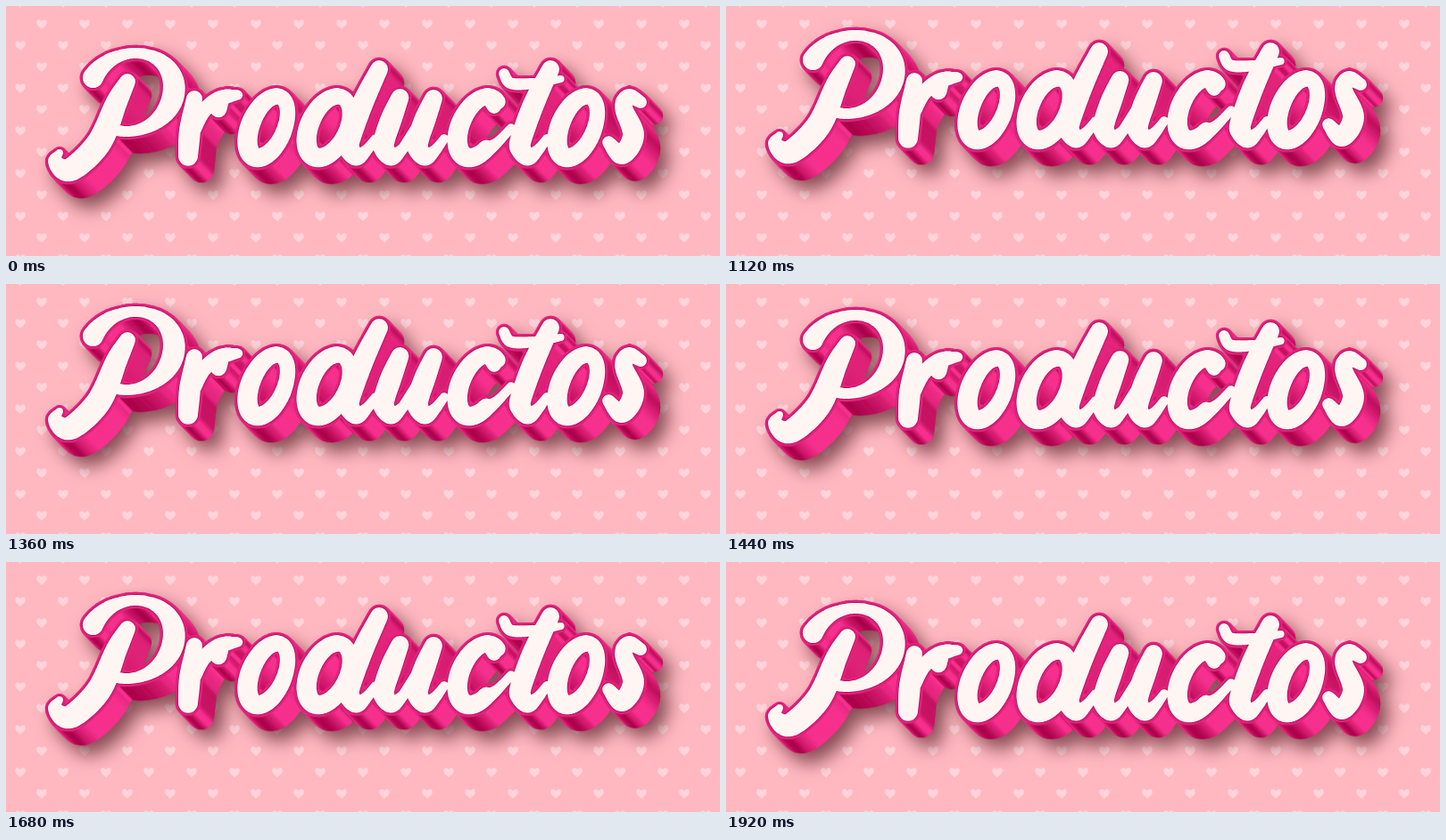
These frames come from a looping animation (800x281 px, 1.96 s). An HTML page with a canvas:

```html
<!DOCTYPE html>
<html lang="es">
<head>
<meta charset="utf-8">
<title>Productos</title>
<style>
html, body { margin: 0; width: 100%; height: 100%; overflow: hidden; background: #ffb8c0; }
canvas { display: block; }
</style>
</head>
<body>
<canvas id="stage" width="800" height="281" role="img" aria-label="Productos"></canvas>
<script>
const W = 800, H = 281, LOOP = 1960, STEP = 40;
const DEPTH = { x: 15, y: 15.5, layers: 34 };
const RIM = 3.2;
const MID = 136, HALF = 34.5;

// Every pen stroke is a list of round stamps [x, y, radius].
function spline(a, b, c, d, t) {
  return b + 0.5 * t * (c - a + t * (2 * a - 5 * b + 4 * c - d + t * (3 * (b - c) + d - a)));
}

function curve(...pts) {
  const at = i => pts[Math.max(0, Math.min(pts.length - 1, i))];
  const stamps = [];
  for (let i = 0; i < pts.length - 1; i++) {
    for (let t = 0; t <= 1; t += 1 / 40) {
      stamps.push([0, 1, 2].map(k =>
        spline(at(i - 1)[k], at(i)[k], at(i + 1)[k], at(i + 2)[k], t)));
    }
  }
  return stamps;
}

// Leaning elliptic arc; nib(cos, sin) gives the pen radius.
function arc(cx, cy, rx, ry, lean, from, to, nib) {
  const stamps = [];
  for (let deg = from; deg <= to; deg += 1.5) {
    const c = Math.cos(deg * Math.PI / 180), s = Math.sin(deg * Math.PI / 180);
    stamps.push([cx + rx * c - lean * ry * s, cy + ry * s, nib(c, s)]);
  }
  return stamps;
}

const ring = (cx, rx, from = 0, to = 360) =>
  arc(cx, MID, rx, HALF, 0.3, from, to, (c, s) => 10 - c + 0.8 * s);

// Slanted downstroke that curls up into the next letter.
function stem(x, top) {
  const slant = y => x + 0.3 * (150 - y) + 0.0015 * (150 - y) ** 2;
  const mid = (top + 150) / 2;
  return curve([slant(top), top, 10], [slant(mid), mid, 12], [x, 150, 12],
    [x, 161, 11.5], [x + 8, 170, 9.5], [x + 19, 162, 6.5], [x + 29, 149, 5]);
}

const strokes = [
  // P
  arc(140, 97, 48, 44, 0.12, -158, 100, c => 6 + 6.5 * c * c),
  curve([136, 85, 9], [124, 108, 12], [104, 154, 14], [72, 184, 13], [55, 175, 8], [60, 165, 4]),
  // r
  curve([211, 104, 9], [206, 140, 12], [204, 169, 11]),
  curve([213, 141, 5], [222, 118, 8], [240, 104, 9], [260, 100, 5.5]),
  curve([241, 106, 9], [238, 116, 9.5]),
  // o, d, u
  ring(293, 20),
  ring(361, 22), stem(385, 71),
  stem(424, 103), curve([443, 163, 6], [465, 128, 6]), stem(462, 104),
  // c
  ring(530, 22, 45, 305), curve([542, 105, 8], [547, 113, 8]),
  curve([537, 163, 9], [551, 153, 6], [566, 137, 5]),
  // t, o
  stem(577, 71), curve([558, 76, 6], [566, 87, 6.5], [592, 87, 6], [622, 82, 4]),
  ring(640, 20),
  // s
  curve([711, 108, 7], [698, 102, 9], [692, 114, 10], [703, 145, 12], [690, 167, 11], [675, 153, 7])
];

function layer() {
  const c = document.createElement('canvas');
  c.width = W;
  c.height = H;
  return c.getContext('2d', { willReadFrequently: true });
}

function inkWord(g, grow, color) {
  g.beginPath();
  for (const [x, y, r] of strokes.flat()) {
    g.moveTo(x + r + grow, y);
    g.arc(x, y, r + grow, 0, 2 * Math.PI);
  }
  g.fillStyle = color;
  g.fill();
}

// Satin side: diagonal faces shine, level and upright ones stay dark.
function sheen(angle) {
  const band = (0.5 - 0.5 * Math.cos(4 * angle)) ** 0.7;
  const b = Math.min(1, band + 0.3 * Math.max(0, Math.cos(angle)));
  return [172 + 74 * b, 4 + 46 * b, 76 + 66 * b];
}

function shadeWalls(g) {
  const img = g.getImageData(0, 0, W, H), px = img.data, n = 3;
  const alpha = (x, y) => px[(y * W + x) * 4 + 3];
  for (let y = n; y < H - n; y++) {
    for (let x = n; x < W - n; x++) {
      if (!alpha(x, y)) continue;
      let gx = 0, gy = 0;
      for (let v = -n; v <= n; v++) {
        for (let u = -n; u <= n; u++) {
          const a = alpha(x + u, y + v);
          gx -= u * a;
          gy -= v * a;
        }
      }
      px.set(sheen(Math.atan2(gy, gx)), (y * W + x) * 4);
    }
  }
  g.putImageData(img, 0, 0);
}

function buildWord() {
  const wall = layer(), solid = layer(), out = layer();
  inkWord(wall, RIM, '#e5207e');
  shadeWalls(wall);
  for (let i = DEPTH.layers; i > 0; i--) {
    const k = i / DEPTH.layers;
    solid.drawImage(wall.canvas, DEPTH.x * k, DEPTH.y * k);
  }
  inkWord(solid, RIM, '#e4207c');
  inkWord(solid, 0.9, '#b4125f');
  inkWord(solid, 0, '#fff5f3');

  out.shadowColor = 'rgba(92, 38, 46, 0.74)';
  out.shadowBlur = 20;
  out.shadowOffsetX = 9;
  out.shadowOffsetY = 11;
  out.drawImage(solid.canvas, 0, 0);
  return out.canvas;
}

function heart(g, x, y) {
  g.moveTo(x, y + 5.5);
  for (const side of [-1, 1]) {
    g.moveTo(x, y - 2.8);
    g.bezierCurveTo(x + side, y - 6.3, x + side * 6, y - 6.3, x + side * 5.8, y - 1.8);
    g.bezierCurveTo(x + side * 5.6, y + 1.5, x + side * 2.5, y + 3, x, y + 5.5);
  }
}

function buildBackdrop() {
  const g = layer();
  g.fillStyle = '#ffb8c0';
  g.fillRect(0, 0, W, H);
  for (let row = -1; row < 12; row++) {
    for (let x = row % 2 ? 16 : 40; x < W + 10; x += 48) {
      g.beginPath();
      heart(g, x, 20.5 + row * 24);
      g.fillStyle = '#ffd4da';
      g.fill('nonzero');
    }
  }
  return g.canvas;
}

// Quick rise, a soft drop, then a steady sink back to rest.
function lift(ms) {
  const t = Math.floor(ms / STEP) * STEP;
  if (t < 1000) return 0;
  if (t < 1240) return Math.round(6 + 28 * (t - 1000) / 240);
  const drop = Math.max(0, 1 - (t - 1240) / 200);
  return Math.round(18 * (LOOP - t) / 520 + 9 * drop * drop);
}

const ctx = document.getElementById('stage').getContext('2d');
const backdrop = buildBackdrop(), word = buildWord();

function draw() {
  ctx.drawImage(backdrop, 0, 0);
  ctx.drawImage(word, 0, -lift(performance.now() % LOOP));
  requestAnimationFrame(draw);
}
draw();
</script>
</body>
</html>
```
